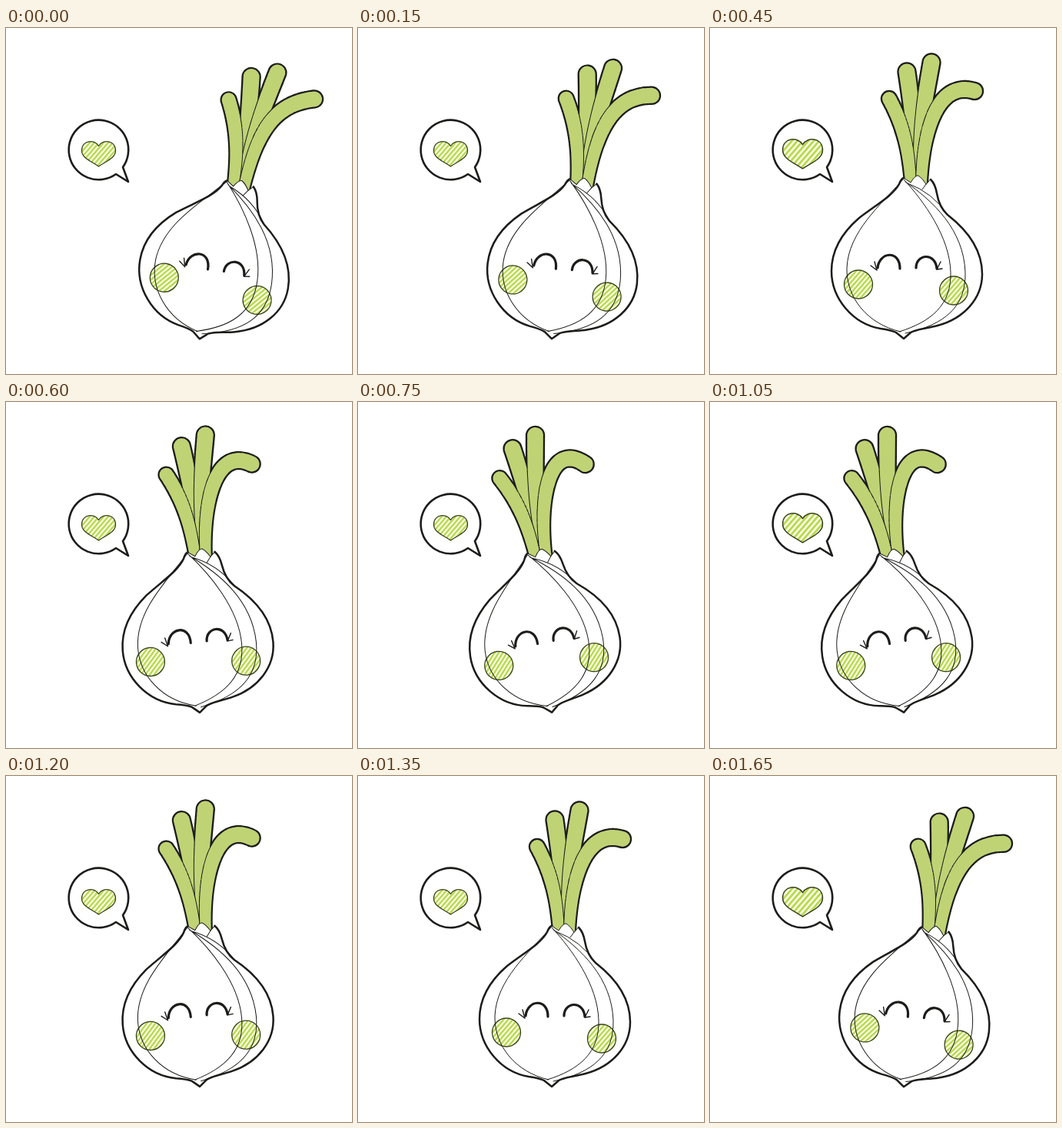
These frames come from a looping animation (450 px wide and 450 px high, 1.8 s). An HTML page with a canvas:

```html
<!DOCTYPE html>
<html lang="en">
<head>
<meta charset="utf-8">
<title>Swaying onion</title>
<style>
  html, body { margin: 0; width: 100%; height: 100%; overflow: hidden; background: #fff; }
  canvas { display: block; }
</style>
</head>
<body>
<canvas width="450" height="450"></canvas>
<script>
const ctx = document.querySelector('canvas').getContext('2d');
const INK = '#1c1c1a', LEAF = '#bfd375', STRIPE = '#b8db48', PALE = '#fcfef3';
const STEP = 150, HALF = 6;

// Upright leaves, back to front: Bézier points from base to tip, tip radius,
// and whether the leaf curls over as the onion leans.
const LEAVES = [
  { points: [[266, 175], [265, 130], [261, 90], [256, 57]], radius: 11.5 },
  { points: [[272, 175], [273, 130], [280, 90], [288, 45]], radius: 11.5 },
  { points: [[261, 201], [258, 155], [251, 125], [233, 92]], radius: 10 },
  { points: [[275, 202], [277, 130], [297, 68], [344, 82]], radius: 11, curls: true },
];

const skin = `Q293 203 295 215 Q298 233 309 243 C336 264 354 290 354 320
  C354 352 330 378 296 387 C282 391 264 392 260 397 L252 404 L242 396
  Q236 393 222 391 C186 385 158 352 158 316 C158 288 172 266 194 247
  C216 230 238 218 246 203 Q249 195 252 195`;
const outline = new Path2D('M287 197 ' + skin);
const body = new Path2D(`M287 197 ${skin} L261 201 Q267 191 271 192 Q276 195 281 203 Z`);
const layers = new Path2D(`M251 197 C222 230 180 265 178 312 C177 350 204 385 248 395
  M252 197 C278 225 312 272 313 318 C314 360 288 382 246 395
  M254 200 C290 225 330 262 332 318 C333 362 306 386 254 397
  M257 202 Q290 214 310 244 M281 203 L276 210`);
const eyes = new Path2D('M218 312 C220 291 247 288 247 313 M268 312 C268 294 293 291 295 313');
const lashes = new Path2D('M209 309 L217 315 L214 304 M300 304 L295 314 L302 313');
const bubble = new Path2D('M143 190 A38.8 38.8 0 1 1 152 181 L159 200 Z');
const heart = new Path2D(`M0 -10 C5 -19 22 -18 22 -4 C22 6 9 10 0 16.5
  C-9 10 -22 6 -22 -4 C-22 -18 -5 -19 0 -10 Z`);
const cheek = new Path2D();
cheek.arc(0, 0, 18.5, 0, 7);

function stroke(path, width, color = INK) {
  ctx.lineWidth = width;
  ctx.strokeStyle = color;
  ctx.stroke(path);
}

function rotateAbout(x, y, degrees) {
  ctx.translate(x, y);
  ctx.rotate(degrees * Math.PI / 180);
  ctx.translate(-x, -y);
}

function hatched(path, x, y, scale = 1) {
  ctx.save();
  ctx.translate(x, y);
  ctx.scale(scale, scale);
  ctx.save();
  ctx.clip(path);
  ctx.fillStyle = PALE;
  ctx.fillRect(-30, -30, 60, 60);
  const lines = new Path2D();
  for (let d = -42; d <= 42; d += 6) {
    lines.moveTo(d - 25, 29);
    lines.lineTo(d + 25, -29);
  }
  stroke(lines, 2.4, STRIPE);
  ctx.restore();
  stroke(path, 1.3, '#39421f');
  ctx.restore();
}

function pointOn(curve, t) {
  while (curve.length > 1) {
    curve = curve.slice(1).map(([x, y], i) => {
      const [px, py] = curve[i];
      return [px + (x - px) * t, py + (y - py) * t];
    });
  }
  return curve[0];
}

function fillLeaf({ points, radius, curls }, lean, grow, color) {
  const [base, low, high, tip] = points;
  const bend = curls ? lean : 0;
  const curve = [base, low,
    [high[0] - 0.8 * bend, high[1] + 1.8 * bend],
    [tip[0] - 0.2 * bend, tip[1] - 1.3 * bend]];
  ctx.beginPath();
  for (let i = 0; i <= 80; i++) {
    const t = i / 80, [x, y] = pointOn(curve, t);
    const r = 8 + (radius - 8) * Math.sin(t * Math.PI / 2) + grow;
    ctx.moveTo(x + r, y);
    ctx.arc(x, y, r, 0, 7);
  }
  ctx.fillStyle = color;
  ctx.fill();
}

function drawLeaves(lean) {
  ctx.save();
  rotateAbout(267, 200, lean * 0.15);
  for (const leaf of LEAVES) fillLeaf(leaf, lean, 1.2, INK);
  for (const leaf of LEAVES) {
    fillLeaf(leaf, lean, 0, INK);
    fillLeaf(leaf, lean, -1, LEAF);
  }
  ctx.restore();
}

function drawBulb() {
  ctx.fillStyle = '#fff';
  ctx.fill(body);
  hatched(cheek, 193, 333.5);
  hatched(cheek, 317, 341.5);
  stroke(body, 1);
  stroke(layers, 1);
  stroke(outline, 2.5);
  stroke(eyes, 3.2);
  stroke(lashes, 1.4);
}

function draw(now) {
  const step = Math.floor(now / STEP) % (2 * HALF);
  const swing = HALF / 2 - Math.min(step, 2 * HALF - step);
  const lean = swing * (swing > 0 ? 3.3 : 4.3);
  ctx.fillStyle = '#fff';
  ctx.fillRect(0, 0, 450, 450);
  ctx.lineCap = ctx.lineJoin = 'round';
  stroke(bubble, 2.6);
  hatched(heart, 120.5, 163.5, step % 4 < 2 ? 1 : 1.18);
  ctx.save();
  rotateAbout(250, 403, lean);
  drawLeaves(lean);
  drawBulb();
  ctx.restore();
}

const start = performance.now();
(function loop() {
  draw(performance.now() - start);
  requestAnimationFrame(loop);
})();
</script>
</body>
</html>
```
